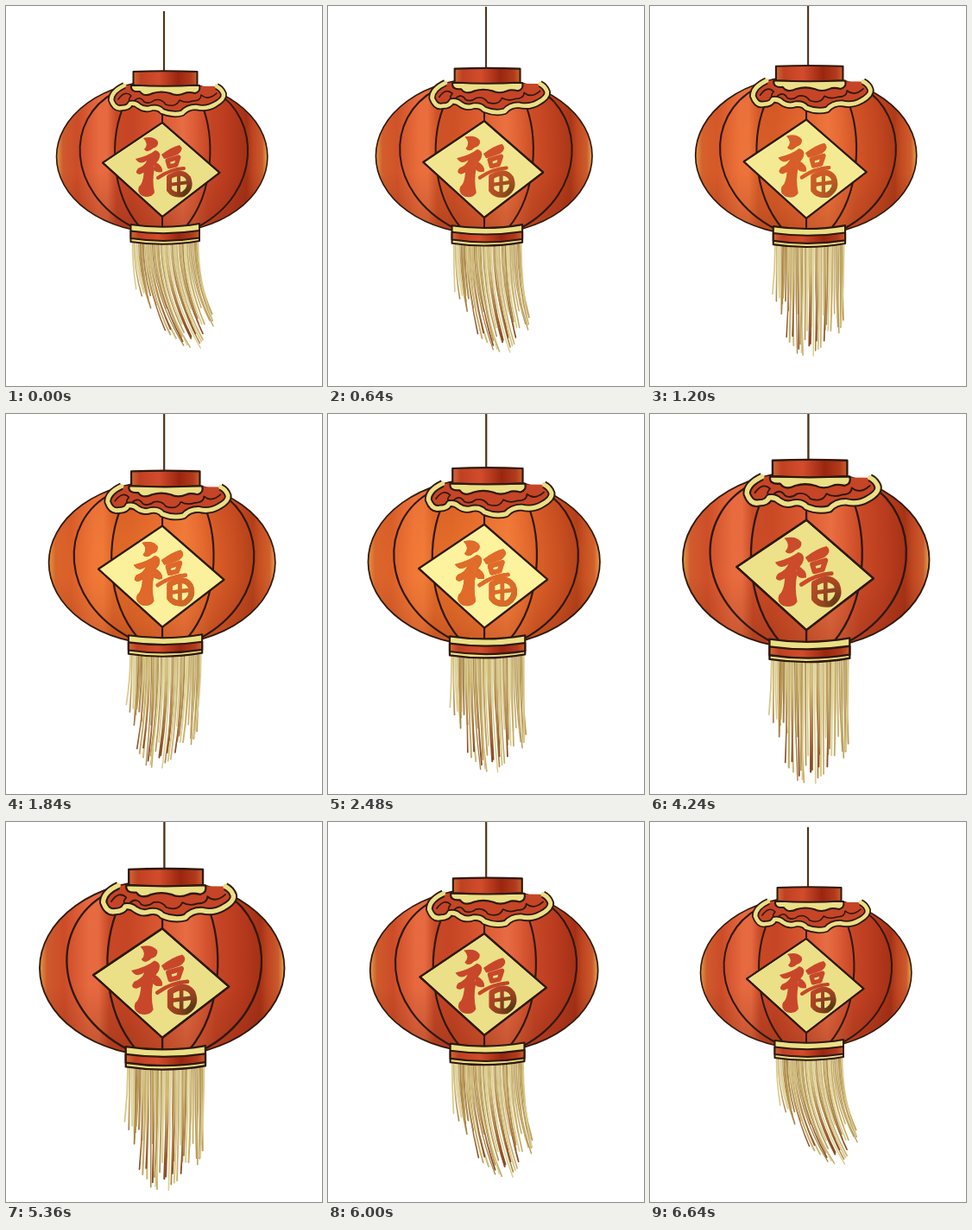
Write an HTML page that moves like this. It is 366 px wide and 440 px high and loops after 6720 ms.

```html
<!DOCTYPE html>
<html lang="zh">
<head>
<meta charset="utf-8">
<title>Lantern</title>
<style>
html, body { margin: 0; width: 100%; height: 100%; overflow: hidden; background: #fff; }
svg { display: block; width: 100vw; height: 100vh; }
.ink { stroke: #2e190b; stroke-width: 2; stroke-linejoin: round; }
.line { fill: none; stroke: #2e190b; stroke-width: 2; stroke-linecap: round; stroke-linejoin: round; }
.cream { fill: #ebdf87; }
</style>
</head>
<body>
<svg viewBox="0 0 366 440">
  <defs>
    <linearGradient id="body">
      <stop offset="0" stop-color="#e09a48"/>
      <stop offset=".03" stop-color="#cf5a2c"/>
      <stop offset=".1" stop-color="#cc4c28"/>
      <stop offset=".2" stop-color="#e7693f"/>
      <stop offset=".24" stop-color="#e66a40"/>
      <stop offset=".285" stop-color="#c74826"/>
      <stop offset=".36" stop-color="#c64524"/>
      <stop offset=".48" stop-color="#d75530"/>
      <stop offset=".6" stop-color="#e86c43"/>
      <stop offset=".65" stop-color="#dd5e37"/>
      <stop offset=".72" stop-color="#c84626"/>
      <stop offset=".82" stop-color="#b83a1e"/>
      <stop offset=".9" stop-color="#a53116"/>
      <stop offset=".93" stop-color="#bd4420"/>
      <stop offset=".975" stop-color="#cb5a2c"/>
      <stop offset="1" stop-color="#e6a850"/>
    </linearGradient>
    <linearGradient id="shade" x2="0" y2="1">
      <stop offset=".6" stop-color="#6a1c0a" stop-opacity="0"/>
      <stop offset="1" stop-color="#6a1c0a" stop-opacity=".3"/>
    </linearGradient>
    <linearGradient id="cap">
      <stop offset="0" stop-color="#cf6a35"/>
      <stop offset=".12" stop-color="#bf4122"/>
      <stop offset=".4" stop-color="#d24c2c"/>
      <stop offset=".7" stop-color="#9a2610"/>
      <stop offset=".9" stop-color="#b23a1c"/>
      <stop offset="1" stop-color="#c8602f"/>
    </linearGradient>
    <linearGradient id="fray" gradientUnits="userSpaceOnUse" x1="0" y1="300" x2="0" y2="375">
      <stop offset="0" stop-color="#cdb772"/>
      <stop offset="1" stop-color="#8a4a22"/>
    </linearGradient>
    <radialGradient id="warm" gradientUnits="userSpaceOnUse" cx="165" cy="178" r="125">
      <stop offset="0" stop-color="#ff9a2c" stop-opacity=".6"/>
      <stop offset=".5" stop-color="#fb8a2c" stop-opacity=".5"/>
      <stop offset="1" stop-color="#f08028" stop-opacity=".2"/>
    </radialGradient>
    <radialGradient id="brush" gradientUnits="userSpaceOnUse" cx="211" cy="217" r="34">
      <stop offset="0" stop-color="#4f3413"/>
      <stop offset=".4" stop-color="#8a401e"/>
      <stop offset="1" stop-color="#c8472a"/>
    </radialGradient>
    <path id="globe" d="M58.5 174.5a122.2 88 0 0 1 244.4 0a122.2 88 0 0 1-244.4 0Z"/>
    <path id="diamond" d="M181 135L247.5 193L181 244L112 181.5Z"/>
    <path id="trim" d="M137 92Q122 99 122 109Q126 120 134 118Q142 118 144 113Q150 112 154 116Q161 121 169 118Q177 117 181 122Q193 127 204 124Q210 117 220 117Q232 120 242 114Q253 108 252 102Q250 96 244 93"/>
    <!-- brush-written good fortune character -->
    <g id="fu">
      <g stroke="none">
        <path d="M159 153Q171 150 176 157Q177 163 170 165Q164 171 160 166Q166 160 159 153Z"/>
        <path d="M150 177Q166 173 173 167Q181 169 177 178Q169 190 155 195Q148 194 153 188Q161 185 163 179Q155 185 150 177Z"/>
        <path d="M160 184Q171 180 172 188Q169 202 172 216Q168 223 158 220Q151 216 154 209Q160 205 160 184Z"/>
        <path d="M172 180Q182 185 181 192Q174 194 171 189Z"/>
        <path d="M180 172Q192 163 201 161Q207 166 199 172Q189 176 183 177Z"/>
      </g>
      <g fill="none" stroke-linecap="round" stroke-linejoin="round">
        <path stroke-width="5" d="M187 179L200 175L197 184L189 186Z"/>
        <path stroke-width="4" d="M176 199Q190 189 206 188M189 207L212 204M200 194V218"/>
        <path stroke-width="6" d="M189 198Q204 189 211 199Q216 211 205 218Q194 220 189 213Z"/>
      </g>
    </g>
  </defs>

  <g id="lantern">
    <path d="M183 6V75" stroke="#4f3015" stroke-width="2"/>
    <g id="tassel" fill="none" stroke-linecap="round"></g>

    <use href="#globe" fill="url(#body)"/>
    <use href="#globe" fill="url(#shade)"/>
    <use href="#globe" class="glow" fill="url(#warm)"/>
    <use href="#globe" class="line" style="stroke-width:1.6"/>
    <path class="line" d="M126 100C69 130 69 215 147 256M138 112C120 150 120 215 155 256M181 120V256M226 112C242 150 242 215 208 256M244 100C293 130 298 215 222 256"/>

    <path fill="#c54526" d="M137 92Q122 99 122 109L134 118L169 118L195 124L220 117L242 114L252 102L244 93Z"/>
    <path class="line" style="stroke-width:1.6" d="M130 108Q138 97 145 104Q139 111 148 110Q155 103 160 111Q166 114 172 109Q180 107 185 114Q197 118 201 109Q208 113 216 110Q226 110 226 103Q234 110 244 101"/>
    <use href="#trim" class="line" style="stroke-width:8;stroke-linecap:butt"/>
    <use href="#trim" class="line" style="stroke:#ebdf87;stroke-width:4.6"/>
    <path class="cream ink" d="M145 92H224Q226 99 219 101Q211 99 207 101Q198 105 190 101Q180 98 170 101Q160 106 155 99Q144 100 145 92Z"/>
    <path class="ink" fill="url(#cap)" d="M147.500 76Q184 74.500 221.500 76V91.500Q184 94 147.500 91.500Z"/>

    <use href="#diamond" class="cream ink"/>
    <use href="#diamond" class="glow" fill="#fff4a0"/>
    <use href="#diamond" class="line"/>
    <use href="#fu" fill="url(#brush)" stroke="url(#brush)"/>
    <use href="#fu" class="glow" fill="#e5702a" stroke="#e5702a"/>

    <path class="cream ink" d="M144.500 253Q184 259 224 252V272Q184 279 144.500 273Z"/>
    <path class="ink" fill="url(#cap)" d="M144.500 260.500Q184 266 224 260V268.500Q184 275 144.500 269Z"/>
  </g>
</svg>
<script>
const LOOP = 6720, STEP = 80, PEAK = 5040, SHUT = 6640, GLOW_PEAK = 2240;
const CX = 180.5, CY = 208, TOP = 274, LONGEST = 123;
const lantern = document.getElementById('lantern');
const tassel = document.getElementById('tassel');
const glows = document.querySelectorAll('.glow');

let seed = 11;
const rand = () => (seed = seed * 16807 % 2147483647) / 2147483647;

const tones = ['#d8c888', '#cdb978', '#b99c58', '#dccd8c', '#a98245', '#c5ac68', 'url(#fray)'];
const COUNT = 44;
const strands = Array.from({ length: COUNT }, (_, i) => {
  const x = 146.5 + 76 * i / (COUNT - 1);
  const reach = Math.min(LONGEST, 64 + (x - 146) * 2.4, LONGEST - (x - 190) * .9);
  const el = document.createElementNS('http://www.w3.org/2000/svg', 'path');
  el.setAttribute('stroke', tones[Math.floor(rand() * tones.length)]);
  el.setAttribute('stroke-width', 1.2 + rand() * .8);
  tassel.append(el);
  return { el, x, length: reach * (.6 + .4 * Math.sqrt(rand())), lean: (rand() - .5) * 6 };
});

// Two swings per loop, the one around the seam being wider
function sway(t) {
  const a = 2 * Math.PI * t / LOOP;
  return 10 + 19 * Math.cos(2 * a) + 7.6 * Math.cos(a) - 2.5 * Math.sin(2 * a);
}

function draw(now) {
  const t = Math.floor(now % LOOP / STEP) * STEP;
  const grow = t < PEAK ? t / PEAK : Math.max(0, (SHUT - t) / (SHUT - PEAK));
  const scale = 1 + .2 * grow;
  lantern.setAttribute('transform',
    `translate(${CX} ${CY}) scale(${scale}) translate(${-CX} ${-CY})`);

  const glow = Math.max(0, 1 - Math.abs(t - GLOW_PEAK) / GLOW_PEAK);
  glows.forEach(el => el.style.opacity = glow);

  const d = sway(t);
  for (const { el, x, length, lean } of strands) {
    const tip = x + lean + d * (length / LONGEST) ** 2;
    el.setAttribute('d', `M${x} ${TOP}Q${x} ${TOP + length / 2} ${tip} ${TOP + length}`);
  }
}

function tick() {
  draw(performance.now());
  requestAnimationFrame(tick);
}
tick();
</script>
</body>
</html>
```
